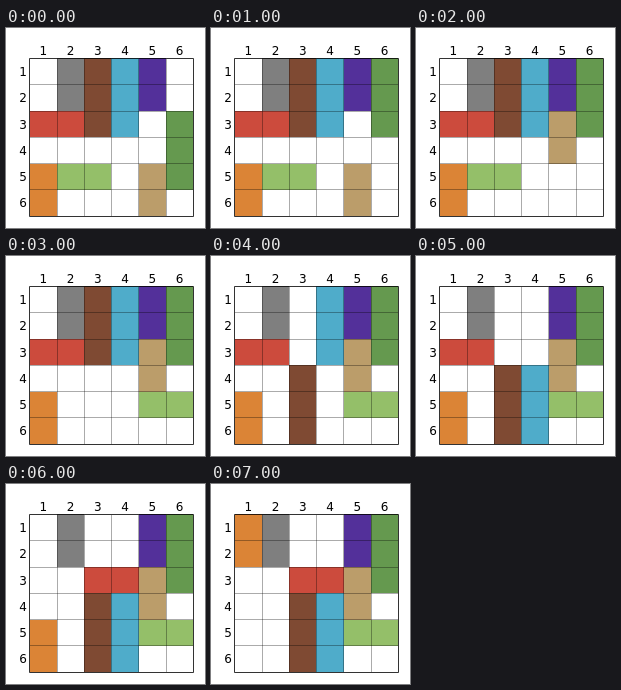
An HTML page that plays this animation: 199x200 px, repeating every 8 s.

```html
<!DOCTYPE html>
<html lang="en">
<head>
<meta charset="utf-8">
<title>Sliding blocks</title>
<style>
html, body { margin: 0; width: 100%; height: 100%; overflow: hidden; background: #fff; }
.board {
  position: absolute; left: 24px; top: 30px;
  display: grid;
  grid-template-columns: 27px 27px 27px 28px 27px 27px;
  grid-template-rows: 27px 26px 26px 27px 26px 26px;
}
.board i {
  grid-area: var(--from);
  background: var(--color);
  animation: 8s step-end infinite;
}
svg { position: absolute; left: 0; top: 0; }
path { fill: none; stroke: #000; }
text { font: 12px "DejaVu Sans", sans-serif; }

/* row / column / row end / column end */
.gray   { --color: #7f7f7f; --from: 1 / 2 / 3 / 3; }
.purple { --color: #53309a; --from: 1 / 5 / 3 / 6; }
.green  { --color: #65994f; --from: 3 / 6 / 6 / 7; --to: 1 / 6 / 4 / 7; }
.tan    { --color: #bb9d6a; --from: 5 / 5 / 7 / 6; --to: 3 / 5 / 5 / 6; }
.lime   { --color: #94bf69; --from: 5 / 2 / 6 / 4; --to: 5 / 5 / 6 / 7; }
.brown  { --color: #7f4a33; --from: 1 / 3 / 4 / 4; --to: 4 / 3 / 7 / 4; }
.blue   { --color: #4facca; --from: 1 / 4 / 4 / 5; --to: 4 / 4 / 7 / 5; }
.red    { --color: #cc4b3d; --from: 3 / 1 / 4 / 3; --to: 3 / 3 / 4 / 5; }
.orange { --color: #db8436; --from: 5 / 1 / 7 / 2; --to: 1 / 1 / 3 / 2; }

.board .green  { animation-name: move1; }
.board .tan    { animation-name: move2; }
.board .lime   { animation-name: move3; }
.board .brown  { animation-name: move4; }
.board .blue   { animation-name: move5; }
.board .red    { animation-name: move6; }
.board .orange { animation-name: move7; }

@keyframes move1 { 12.5% { grid-area: var(--to); } 100% { grid-area: var(--from); } }
@keyframes move2 { 25%   { grid-area: var(--to); } 100% { grid-area: var(--from); } }
@keyframes move3 { 37.5% { grid-area: var(--to); } 100% { grid-area: var(--from); } }
@keyframes move4 { 50%   { grid-area: var(--to); } 100% { grid-area: var(--from); } }
@keyframes move5 { 62.5% { grid-area: var(--to); } 100% { grid-area: var(--from); } }
@keyframes move6 { 75%   { grid-area: var(--to); } 100% { grid-area: var(--from); } }
@keyframes move7 { 87.5% { grid-area: var(--to); } 100% { grid-area: var(--from); } }
</style>
</head>
<body>
<div class="board">
  <i class="gray"></i><i class="purple"></i><i class="green"></i>
  <i class="tan"></i><i class="lime"></i><i class="brown"></i>
  <i class="blue"></i><i class="red"></i><i class="orange"></i>
</div>
<svg width="199" height="200" viewBox="0 0 199 200">
  <path stroke-opacity=".33" d="M51.5 31V188M78.5 31V188M105.5 31V188M132.5 31V188M160.5 31V188
    M24 56.5H187M24 83.5H187M24 109.5H187M24 135.5H187M24 161.5H187"/>
  <path stroke-opacity=".8" d="M23.5 30.5H187.5V188.5H23.5Z"/>
  <g text-anchor="middle">
    <text x="37.4" y="27">1</text><text x="64.6" y="27">2</text><text x="91.9" y="27">3</text>
    <text x="119.1" y="27">4</text><text x="146.4" y="27">5</text><text x="173.6" y="27">6</text>
  </g>
  <g text-anchor="end">
    <text x="21" y="48">1</text><text x="21" y="74">2</text><text x="21" y="101">3</text>
    <text x="21" y="127">4</text><text x="21" y="153">5</text><text x="21" y="179">6</text>
  </g>
</svg>
</body>
</html>
```
